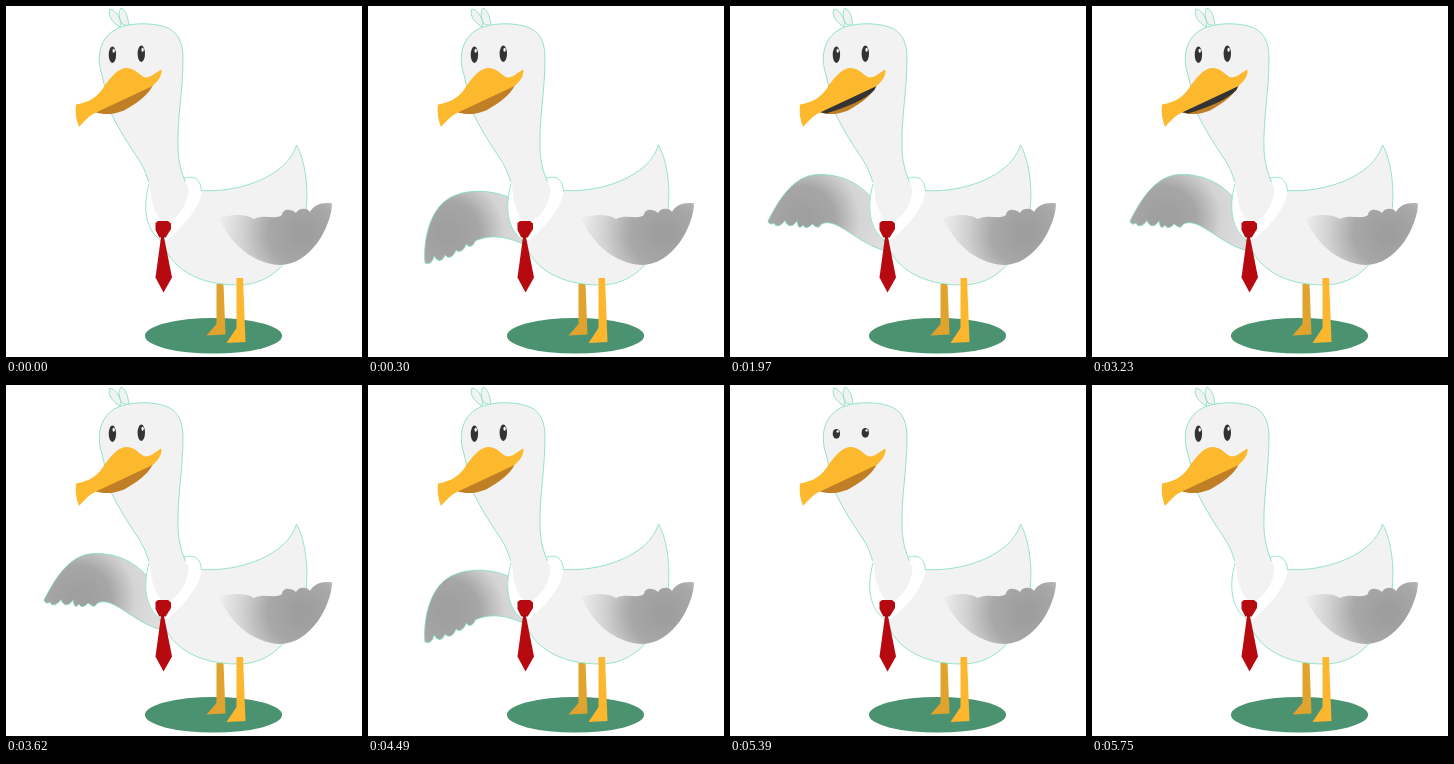
These frames come from a looping animation (356x351 px, 6620 ms). An HTML page with a canvas:

```html
<!DOCTYPE html>
<html lang="en">
<head>
<meta charset="utf-8">
<title>Seagull</title>
<style>
html, body { margin: 0; width: 100%; height: 100%; overflow: hidden; background: #fff; }
canvas { display: block; }
</style>
</head>
<body>
<canvas id="stage" width="356" height="351"></canvas>
<script>
const ctx = document.getElementById('stage').getContext('2d');
const LOOP = 6620;
const PLUMAGE = '#f2f2f2', EDGE = '#7cdfba', YELLOW = '#fdb92e', BROWN = '#c07f25', DARK = '#333';

const shape = {
  backLeg: 'M210.500 278H217.500L219.500 328.500L200.500 329.500L210.500 318Z',
  frontLeg: 'M230.500 272H237L239.500 336L220.500 337L230.500 322Z',
  body: 'M150 184L195 184.500C232 187 281 171 290.500 139C298 152 303 178 300 205C292 253 266 279 232 279C191 279 166 262 157 238C147 222 145 200 150 184Z',
  collar: 'M143 178C137 200 138 224 157 236C168 231 194 204 195.500 186C195 171 186 170 179 172Z',
  head: 'M115 21C130 16 151 17 163 22.500C173 28 177 38 177 52C177 86 171 112 172 144C173 160 177 172 182.500 182C182 197 173 214 158 218C151 211 146 201 145 188C144 178 140 165 133 154C123 139 113 124 105 107L96 69C90 51 93 29 115 21Z',
  leftTuft: 'M114 21C106 16 101 9 104 3C109 4 113 9 115 17Z',
  rightTuft: 'M116 18C113 13 112 6 115 2C120 4 122 11 123 20Z',
  beak: 'M155.500 63.500C156 71 151 76 146.500 80L90 106.500C82 110 78 116 73 121C70 114 69 106 70 98.500C84 96 92 91 99 79C106 70 112 62 121 62C130 62 134 71 140 71.500C146 71 150 66 155.500 63.500Z',
  jaw: 'M89 106L147 79C143 88 132 97 118 104.500C107 109 97 109 89 106Z',
  mouth: 'M90 106L146 80L144.500 84C136 93 118 101 96 107.500Z',
  knot: 'M149.500 217L152 215H162L165 217.500V223L160 231H153L149.500 224Z',
  tie: 'M155 231H158L166 271.500L157.500 286.500L149.500 271.500Z',
  rightWing: 'M213 212C229 207 241 209 248 213C258 208 270 214 276 209C277 202 285 203 290 207C292 202 301 201 304 206C308 199 316 196 326 197.500C326 208 320 225 312 236C300 252 286 261 268 258.500C242 254 224 236 213 212Z',
  midWing: 'M57 257C55 234 62 204 80 193C97 182 124 184 140 191L155 238C141 232 125 227 107 235C106 239 102 243 98 238C97 243 92 248 88 244C86 250 81 254 77 249C75 255 70 257 66 250C65 256 61 259 57 257Z',
  highWing: 'M38 215C46 200 61 169 88 168.500C110 168 127 176 140 190L157 245C136 241 118 223 104 218C97 216 92 216 89 221C86 222 84 219 82 218C79 222 75 223 73 219C70 223 68 222 67 215C63 221 58 222 55 214.500C51 220 46 222 44 217C41 219 39 218 38 215Z'
};
for (const name in shape) shape[name] = new Path2D(shape[name]);

function paint(name, fill, edge) {
  ctx.fillStyle = fill;
  ctx.fill(shape[name]);
  if (!edge) return;
  ctx.strokeStyle = edge;
  ctx.lineWidth = 0.8;
  ctx.stroke(shape[name]);
}

function glow(x, y, radius, stops) {
  const g = ctx.createRadialGradient(x, y, 8, x, y, radius);
  stops.forEach((c, i) => g.addColorStop(i / (stops.length - 1), c));
  return g;
}

function oval(x, y, rx, ry, fill) {
  ctx.fillStyle = fill;
  ctx.beginPath();
  ctx.ellipse(x, y, rx, ry, 0, 0, Math.PI * 2);
  ctx.fill();
}

// Value of the last [time, value] key reached.
function held(keys, t) {
  let value = keys[0][1];
  for (const [at, v] of keys) if (t >= at) value = v;
  return value;
}

const wingKeys = [[0, 0], [100, 1], [200, 2], [300, 3], [400, 4], [4490, 3], [4590, 2], [4690, 1], [4790, 0]];
const mouthKeys = [[0, 0], [1970, 1], [2600, 0], [3230, 1], [3360, 0], [3490, 1], [3620, 0]];
const eyeKeys = [[0, 1], [970, 0.5], [1080, 0.1], [1190, 0.5], [1300, 1],
  [5390, 0.6], [5480, 0.1], [5570, 0.1], [5660, 0.6], [5750, 1]];

function leftWing(pose) {
  if (!pose) return;
  const high = pose === 4;
  const shade = ['#9f9f9f', '#a6a6a6', '#d4d4d4', '#dedede'];
  ctx.save();
  if (pose < 3) {
    const size = pose === 2 ? 0.85 : 0.65;
    ctx.translate(148, 225);
    ctx.rotate(pose === 2 ? -0.55 : -1.2);
    ctx.scale(size, size);
    ctx.translate(-148, -225);
  }
  if (high) paint('highWing', glow(72, 213, 82, shade), EDGE);
  else paint('midWing', glow(79, 227, 82, shade), EDGE);
  ctx.restore();
}

function eye(x, y, open) {
  oval(x, y, 3.7, 8.2 * open, DARK);
  if (open > 0.4) oval(x + 1.3, y - 4 * open, 1.2, 2 * open, '#fff');
}

function draw(t) {
  ctx.fillStyle = '#fff';
  ctx.fillRect(0, 0, 356, 351);
  oval(207.5, 329.8, 68.6, 17.8, '#4b9270');
  paint('backLeg', '#e0a32d');
  leftWing(held(wingKeys, t));
  paint('body', PLUMAGE, EDGE);
  paint('frontLeg', '#fcb72e');
  paint('collar', '#fff');
  ctx.save();
  ctx.beginPath();
  ctx.rect(0, 0, 158, 351);
  ctx.rect(158, 0, 198, 185);
  ctx.clip();
  paint('collar', '#fff', EDGE);
  ctx.restore();
  paint('leftTuft', PLUMAGE, EDGE);
  paint('rightTuft', PLUMAGE, EDGE);

  // The neck tucks into the collar, so its outline stops there.
  paint('head', PLUMAGE);
  ctx.save();
  ctx.beginPath();
  ctx.rect(0, 0, 356, 176);
  ctx.clip();
  paint('head', PLUMAGE, EDGE);
  ctx.restore();

  paint('tie', '#b70a10');
  paint('knot', '#b70a10');
  ctx.strokeStyle = '#8d080d';
  ctx.lineWidth = 0.8;
  ctx.beginPath();
  ctx.moveTo(153, 231);
  ctx.lineTo(160, 231);
  ctx.stroke();

  const open = held(eyeKeys, t);
  eye(106.4, 48.8, open);
  eye(135.3, 47.8, open);

  paint('jaw', BROWN);
  if (held(mouthKeys, t)) paint('mouth', DARK);
  paint('beak', YELLOW);

  paint('rightWing', glow(296, 228, 86, ['#9e9e9e', '#a8a8a8', '#d2d2d2', '#f1f1f1']));
}

function tick() {
  draw(performance.now() % LOOP);
  requestAnimationFrame(tick);
}
tick();
</script>
</body>
</html>
```
